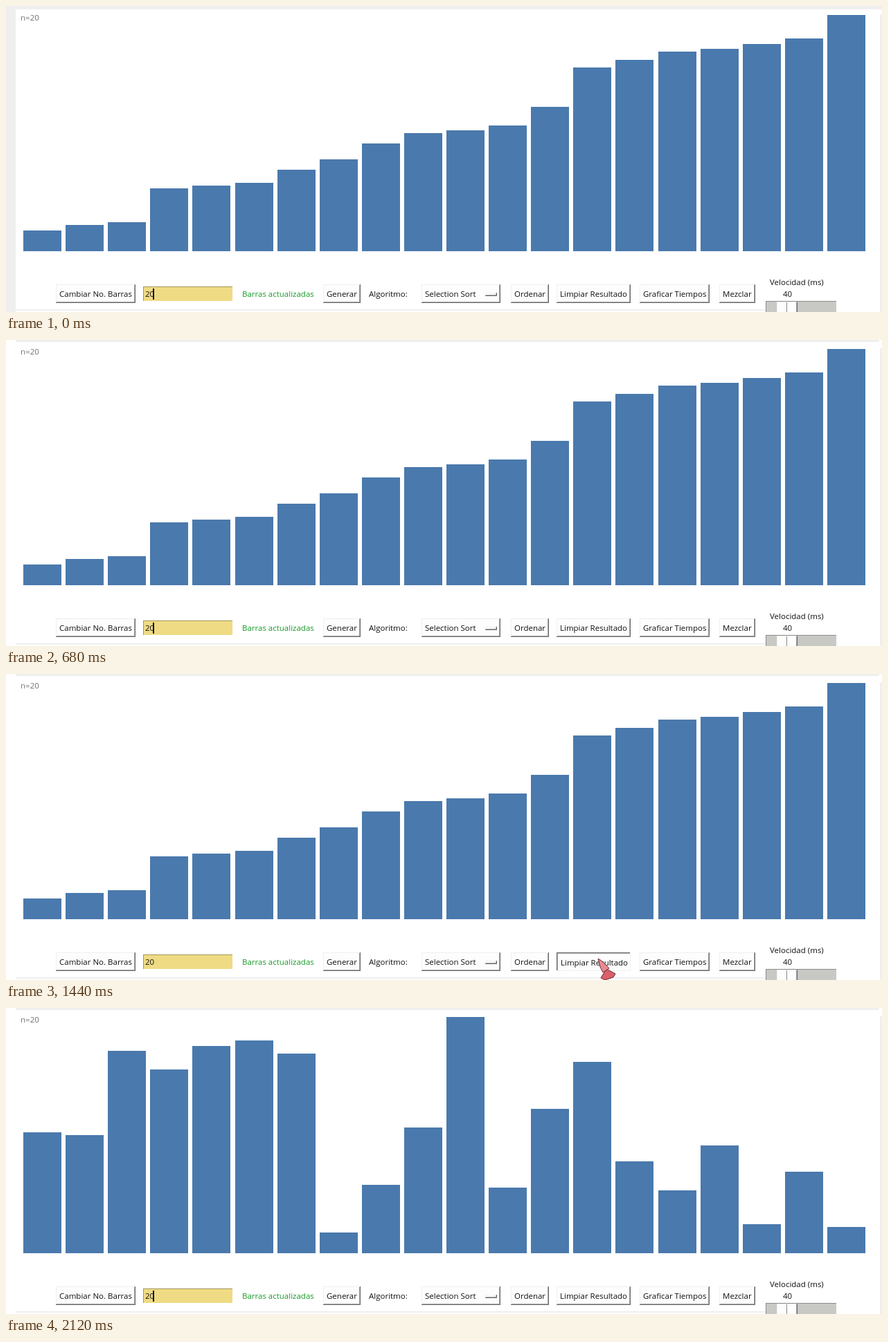
These frames come from a looping animation (1265 by 443 pixels, 2160 ms). An HTML page with a canvas:

```html
<!DOCTYPE html>
<html lang="es">
<head>
<meta charset="utf-8">
<title>Selection Sort</title>
<style>
  html, body { margin: 0; width: 100%; height: 100%; overflow: hidden; background: #fff; }
  canvas { display: block; }
</style>
</head>
<body>
<canvas id="stage" width="1265" height="443"></canvas>
<script>
const ctx = document.getElementById('stage').getContext('2d');
const LOOP = 2160, PRESS = 1380, RELEASE = 1820;
const BASELINE = 421;

const values = [46, 45, 77, 70, 79, 81, 76, 8, 26, 48, 90, 25, 55, 73, 35, 24, 41, 11, 31, 10];
const sorted = [...values].sort((a, b) => a - b);

const clamp = (v, min, max) => Math.min(max, Math.max(min, v));

function ease(t, from, to) {
  const u = clamp((t - from) / (to - from), 0, 1);
  return u * u * (3 - 2 * u);
}

function rect(x, y, w, h, color) {
  ctx.fillStyle = color;
  ctx.fillRect(x, y, w, h);
}

function text(label, x, y = BASELINE, color = '#111') {
  ctx.fillStyle = color;
  ctx.fillText(label, x, y);
}

function polygon(points, fill) {
  ctx.beginPath();
  points.forEach(([x, y]) => ctx.lineTo(x, y));
  ctx.closePath();
  ctx.fillStyle = fill;
  ctx.fill();
  ctx.stroke();
}

function bevel(x, y, w, h, pressed = false) {
  const light = '#f0f0f0', dark = '#696969', shade = '#a8a8a8';
  const inner = pressed ? 1 : -2;
  rect(x, y, w, h, pressed ? light : dark);
  rect(x, y, w - 1, h - 1, pressed ? dark : light);
  rect(x + 1, y + 1, w - 2, h - 2, '#fdfdfd');
  rect(x + 1, pressed ? y + inner : y + h + inner, w - 2, 1, shade);
  rect(pressed ? x + inner : x + w + inner, y + 1, 1, h - 2, shade);
}

function button(label, left, { pressed = false, extra = 0 } = {}) {
  const width = Math.round(ctx.measureText(label).width) + 10 + extra;
  bevel(left, 403, width, 27, pressed);
  text(label, left + 5 + pressed, BASELINE + pressed);
}

function drawWindow(t) {
  const edge = '#efefef';
  rect(0, 0, 1265, 443, '#fff');
  rect(14, 0, 1247, 3, edge);
  rect(1262, 12, 3, 431, edge);
  rect(14, 439, 1083, 2, edge);
  if (t < 580) {
    rect(0, 0, 14, 443, edge);
    rect(0, 0, 1265, 5, edge);
  }
}

function drawBars(t) {
  const bars = t < RELEASE ? sorted : values;
  bars.forEach((value, i) => {
    const h = Math.round(value * 3.8);
    rect(Math.round(25 + 61.1 * i), 355 - h, 55, h, '#4a79ad');
  });
}

function drawEntry(t) {
  rect(198, 406, 129, 21, '#a3965c');
  rect(199, 407, 128, 20, '#efdb84');
  text('20', 201);
  // The caret stops blinking while the pressed button blocks the interface.
  const blinkTime = t - clamp(t - PRESS, 0, RELEASE - PRESS);
  if ((blinkTime + 320) % 900 < 600) rect(212, 409, 2, 16, '#111');
}

function drawSlider() {
  text('Velocidad (ms)', 1103, 404);
  text('40', 1122);
  rect(1097, 427, 102, 16, '#8c8c8c');
  rect(1098, 428, 101, 15, '#c8c8c5');
  bevel(1113, 428, 30, 17);
  rect(1127, 429, 1, 14, '#888');
}

function drawControls(t) {
  text('n=20', 21, 21, '#707070');
  button('Cambiar No. Barras', 72);
  drawEntry(t);
  text('Barras actualizadas', 341, BASELINE, '#159a26');
  button('Generar', 458);
  text('Algoritmo:', 524);
  button('Selection Sort', 600, { extra: 30 });
  bevel(692, 415, 17, 5);
  button('Ordenar', 729);
  button('Limpiar Resultado', 795, { pressed: t >= PRESS && t < RELEASE });
  button('Graficar Tiempos', 915);
  button('Mezclar', 1030);
  drawSlider();
}

function drawPointer(t) {
  const away = 1 - ease(t, 1180, 1360) + ease(t, RELEASE + 20, 2040);
  ctx.save();
  ctx.translate(855 + 10 * away, 412 + 36 * away);
  ctx.strokeStyle = '#6b2530';
  ctx.lineJoin = 'round';
  polygon([[12, 15], [25, 22], [22, 27], [10, 31], [4, 28]], '#d9606c');
  polygon([[0, 0], [6, 4], [16, 14], [7, 20], [3, 12]], '#e88b92');
  ctx.restore();
}

function draw(t) {
  ctx.font = '11.5px "Open Sans", "Noto Sans", sans-serif';
  drawWindow(t);
  drawBars(t);
  drawControls(t);
  drawPointer(t);
}

const start = performance.now();
function tick() {
  draw((performance.now() - start) % LOOP);
  requestAnimationFrame(tick);
}
tick();
</script>
</body>
</html>
```
